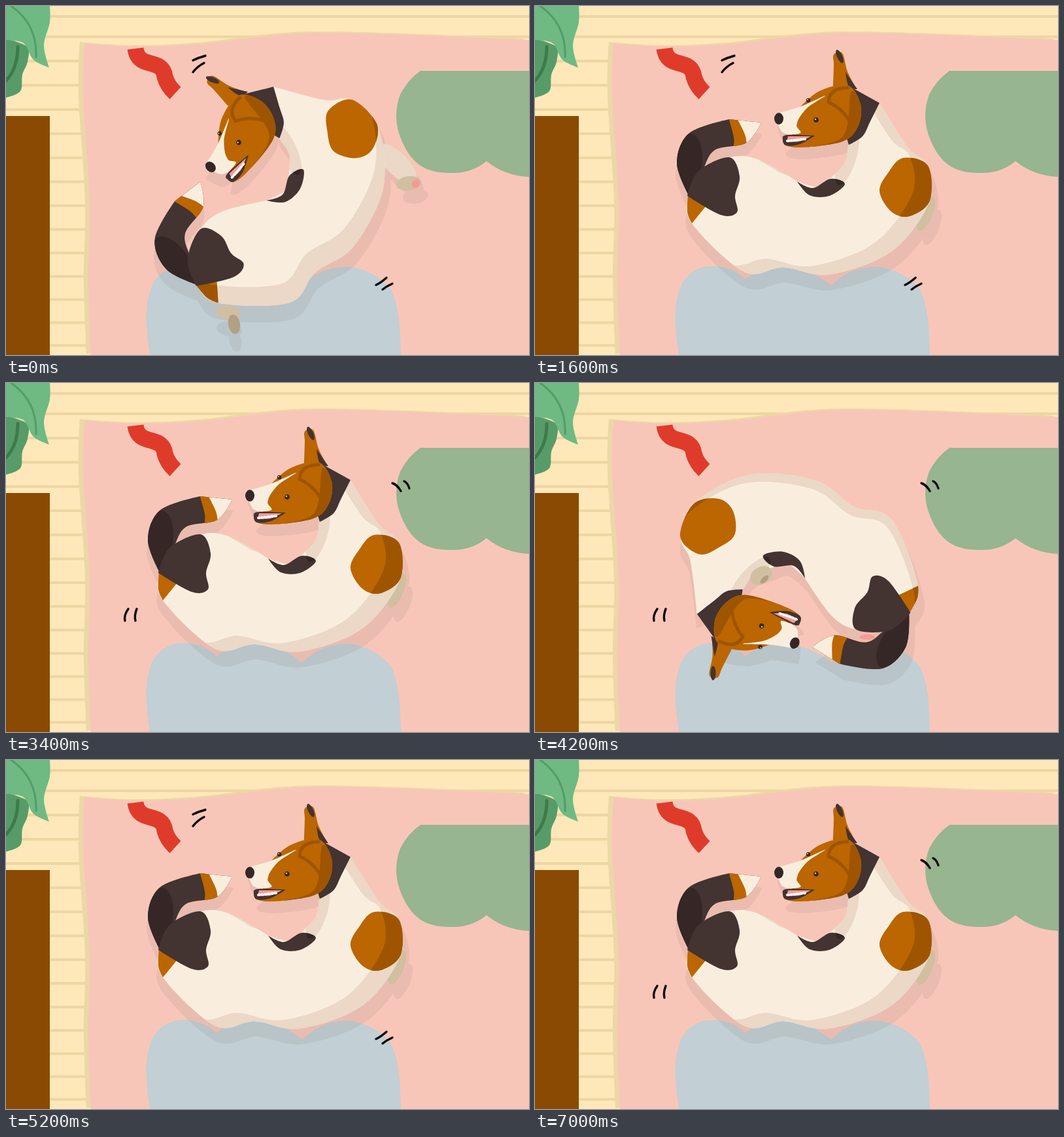
Recreate the animation shown at these times as an HTML page with a canvas. Size 800x533 px, loop 7200 ms.

```html
<!DOCTYPE html>
<html lang="en">
<head>
<meta charset="utf-8">
<title>Dog chasing its tail</title>
<style>
html, body { margin: 0; width: 100%; height: 100%; overflow: hidden; background: #f8c6b8; }
canvas { display: block; width: 100%; height: 100%; }
</style>
</head>
<body>
<canvas id="stage" width="800" height="533"></canvas>
<script>
const ctx = document.getElementById('stage').getContext('2d');
const STEP = 200, TURN = 9;
const PIVOT = { x: 410, y: 282 };
const BROWN = '#bb6600', DARK_BROWN = '#9f5500', BLACK = '#433331', DARK = '#342725';
const CREAM = '#f9eede', BEIGE = '#ebd8c6', TAN = '#d0bfa1', DARK_TAN = '#b39f81', PINK = '#f79a94';

// Smooth closed curve through "x,y" key points; a trailing "!" marks a corner.
function blob(text) {
  const pts = text.trim().split(/\s+/).map(s => {
    const [x, y] = s.split(',').map(parseFloat);
    return { x, y, corner: s.endsWith('!') };
  });
  const n = pts.length, at = i => pts[(i + n) % n];
  const tangent = i => at(i).corner ? [0, 0]
    : [(at(i + 1).x - at(i - 1).x) / 6, (at(i + 1).y - at(i - 1).y) / 6];
  const path = new Path2D();
  path.moveTo(pts[0].x, pts[0].y);
  for (let i = 0; i < n; i++) {
    const a = at(i), b = at(i + 1), [ax, ay] = tangent(i), [bx, by] = tangent(i + 1);
    path.bezierCurveTo(a.x + ax, a.y + ay, b.x - bx, b.y - by, b.x, b.y);
  }
  path.closePath();
  return path;
}

function oval(x, y, rx, ry, degrees = 0) {
  const path = new Path2D();
  path.ellipse(x, y, rx, ry, degrees * Math.PI / 180, 0, Math.PI * 2);
  return path;
}

function fill(path, color) {
  ctx.fillStyle = color;
  ctx.fill(path);
}

function line(d, color, width) {
  ctx.strokeStyle = color;
  ctx.lineWidth = width;
  ctx.stroke(new Path2D(d));
}

function shaded(path, color, dark, ...shades) {
  fill(path, color);
  ctx.save();
  ctx.clip(path);
  ctx.fillStyle = dark;
  shades.forEach(s => ctx.fill(s, 'evenodd'));
  ctx.restore();
}

function moved(path, matrix) {
  const out = new Path2D();
  out.addPath(path, matrix);
  return out;
}

const dog = {
  body: blob(`298,231 340,234 401,268! 436,277 452,263 475,238 484,200 527,148! 571,217 599,242
    603,300 545,375 450,410 380,399 320,406 240,332 236,288 255,252`),
  spot: blob('563,232 601,244 604,297 573,321 545,314 527,283 540,255'),
  hip: blob('297,231 313,260 306,290 309,315 284,319 233,290! 250,252'),
  rump: blob('234,289! 262,305! 240,332! 233,315'),
  arm: blob('401,268! 425,278 452,264 474,272 450,290 420,289'),
  tail: blob('236,291! 217,240 236,194 297,173! 346,178! 323,209 275,220 256,252'),
  tailBand: blob('295,168! 350,168! 350,215! 303,218! 304,200'),
  tailTip: blob('307,168! 350,168! 350,215! 324,215! 321,196'),
  tailShade: oval(228, 250, 26, 56, 12),
  collar: blob('478,121! 527,148! 512,178 501,199 480,212! 470,165'),
  neckShade: oval(477, 233, 14, 42, 18),
  head: blob('405,155! 435,130 478,121 498,150 494,184 470,207 405,216 380,209 398,190'),
  headShade: blob('484,130 502,165 482,208 398,218 470,200'),
  muzzle: blob('367,165! 405,154 444,137 416,156 400,180 406,194 379,193'),
  nose: oval(373, 172, 7, 9),
  mouth: blob('379,204 385,197 428,198! 405,211 384,213'),
  tongue: blob('387,199! 422,199! 404,207 385,207!'),
  ear: blob('456,122! 457,90 457,74 470,72 478,100 491,125!'),
  earTip: oval(466, 77, 4, 11, -25),
  earBase: blob('475,101! 493,127! 480,123')
};

// Key poses over one turn: step, rotation, drift, direction of the unlit side, paws.
const side = {
  angle: 0, x: 0, y: 0, shadeX: 26, shadeY: 13,
  behind: [[oval(598, 317, 10, 28, 22), TAN]], front: []
};
const upper = {
  step: 0, angle: -43, x: 5, y: 19, shadeX: -10, shadeY: 30,
  behind: [
    [oval(598, 241, 40, 17, 45), BEIGE], [oval(616, 271, 19, 11, -8), TAN],
    [oval(627, 271, 6, 7, 40), PINK],
    [oval(340, 468, 19, 11, 10), TAN], [oval(349, 486, 9, 15, -10), DARK_TAN]
  ],
  front: []
};
const lower = {
  step: 3, angle: -154.6, x: 1, y: 0, shadeX: 0, shadeY: 14,
  behind: [],
  front: [
    [oval(346, 294, 18, 13, -30), TAN], [oval(351, 300, 8, 4, -45), DARK_TAN],
    [oval(508, 388, 12, 4), PINK]
  ]
};
const raised = { ...lower, step: 5, angle: -236, x: -8, y: -10, behind: [], front: [] };
const keys = [upper, lower, raised, { ...side, step: 8, angle: -360 }];

function matrixOf({ angle, x, y }) {
  return new DOMMatrix().translate(PIVOT.x + x, PIVOT.y + y)
    .rotate(angle).translate(-PIVOT.x, -PIVOT.y);
}

// Paws are placed on the stage, then carried into the dog's own space.
keys.forEach(key => {
  const inverse = matrixOf(key).inverse();
  const carry = ([path, color]) => [moved(path, inverse), color];
  if (key !== raised) {
    key.behind = key.behind.map(carry);
    key.front = key.front.map(carry);
  }
  key.outline = new Path2D();
  [dog.body, dog.tail, dog.head, dog.muzzle, ...key.behind.map(p => p[0])]
    .forEach(p => key.outline.addPath(p));
});

function poseAt(step) {
  const next = keys.findIndex(k => k.step >= step);
  const b = keys[next], a = keys[Math.max(0, next - 1)];
  const t = a === b ? 0 : (step - a.step) / (b.step - a.step);
  const pose = { ...(t < 0.5 ? a : b) };
  for (const name of ['angle', 'x', 'y', 'shadeX', 'shadeY'])
    pose[name] = a[name] + (b[name] - a[name]) * t;
  return pose;
}

const rug = blob('120,57! 200,62 300,58 480,41 800,52! 800,533! 130,533! 126,420 128,300 118,140');
const green = new Path2D(`M634 99H800V261Q762 259 735 237Q712 256 680 255C640 255 620 240 605 205
  Q590 170 603 135Q615 112 634 99`);
const blue = new Path2D(`M220 533C214 490 211 460 222 430C232 405 255 396 275 397Q304 399 322 417
  Q345 398 381 398Q425 402 453 427Q480 399 520 398C555 400 580 420 590 435C602 465 603 490 604 533Z`);
const backLeaf = blob('0,50! 32,62 33,85 25,105 22,130 0,140!');
const frontLeaf = blob('0,0! 67,0! 67,25 58,60 66,94! 42,82 27,57 0,52!');

const marks = [
  ['M286 83Q294 79 305 76', 'M286 101Q293 92 303 87', 'M566 426Q573 423 582 415', 'M576 433Q582 428 591 424'],
  ['M591 153Q598 155 604 165', 'M609 150Q614 152 617 161', 'M187 345Q180 355 182 363', 'M200 345Q196 355 198 363']
];

function drawRoom() {
  ctx.fillStyle = '#fee7b9';
  ctx.fillRect(0, 0, 800, 533);
  ctx.fillStyle = '#edd6a3';
  ctx.fillRect(0, 14, 800, 4);
  // The boards narrow slightly towards the bottom.
  for (let k = 0; k < 14; k++) ctx.fillRect(0, 45 + 37.1 * k - 0.005 * k ** 3, 800, 4);
  fill(moved(rug, new DOMMatrix().translate(-7, -2)), '#ecd7a7');
  fill(rug, '#f8c6b8');
  fill(green, '#97b58f');
  fill(blue, '#c2cfd4');
  ctx.lineCap = 'butt';
  line('M198 65C202 98 240 78 243 108Q247 122 259 133', '#df3b2b', 25);
  ctx.lineCap = 'round';
  ctx.fillStyle = '#8a4a03';
  ctx.fillRect(0, 168, 67, 365);
  fill(backLeaf, '#579c68');
  line('M18 62Q18 95 0 114', '#3f7a4b', 5);
  fill(frontLeaf, '#6eba82');
  line('M8 0Q48 28 46 78', '#559b69', 3);
}

function drawEye(x, y, r) {
  fill(oval(x, y, r, r), DARK);
  fill(oval(x - 1, y - 1, r / 3, r / 3), '#d9c7b5');
}

function drawHead() {
  fill(dog.collar, BLACK);
  fill(dog.ear, BROWN);
  fill(dog.earTip, BLACK);
  fill(dog.earBase, BLACK);
  shaded(dog.head, BROWN, DARK_BROWN, dog.headShade);
  line('M478 125Q450 125 449 147Q474 158 485 184', DARK_BROWN, 5);
  fill(dog.muzzle, CREAM);
  fill(dog.nose, DARK);
  fill(dog.mouth, BLACK);
  fill(dog.tongue, PINK);
  for (let x = 387; x < 416; x += 5) fill(oval(x, 206 - (x - 387) / 9, 3, 2), '#fff');
  drawEye(430, 174, 3.8);
  drawEye(418, 144, 3.2);
}

function drawDog(pose) {
  const m = matrixOf(pose);
  const cast = new DOMMatrix().translate(PIVOT.x + 4, PIVOT.y + 20)
    .scale(1.03).translate(-PIVOT.x, -PIVOT.y).multiply(m);
  fill(moved(pose.outline, cast), 'rgba(110,100,100,.1)');

  // Everything outside a shifted copy of the body lies in shade.
  const shade = new Path2D();
  shade.rect(0, 0, 800, 600);
  shade.addPath(dog.body, new DOMMatrix().translate(-pose.shadeX, -pose.shadeY));

  ctx.save();
  ctx.transform(m.a, m.b, m.c, m.d, m.e, m.f);
  pose.behind.forEach(p => fill(...p));
  shaded(dog.body, CREAM, BEIGE, shade, dog.neckShade);
  shaded(dog.spot, BROWN, DARK_BROWN, shade);
  shaded(dog.rump, BROWN, DARK_BROWN, shade);
  shaded(dog.arm, BLACK, DARK, dog.neckShade);
  pose.front.forEach(p => fill(...p));
  shaded(dog.tail, BLACK, DARK, dog.tailShade);
  shaded(dog.tail, 'transparent', BROWN, dog.tailBand);
  shaded(dog.tail, 'transparent', CREAM, dog.tailTip);
  fill(dog.hip, BLACK);
  drawHead();
  ctx.restore();
}

function render() {
  const step = Math.floor(performance.now() / STEP);
  drawRoom();
  drawDog(poseAt(step % TURN));
  marks[step % 2].forEach(d => line(d, '#0b0808', 3.4));
  requestAnimationFrame(render);
}
render();
</script>
</body>
</html>
```
